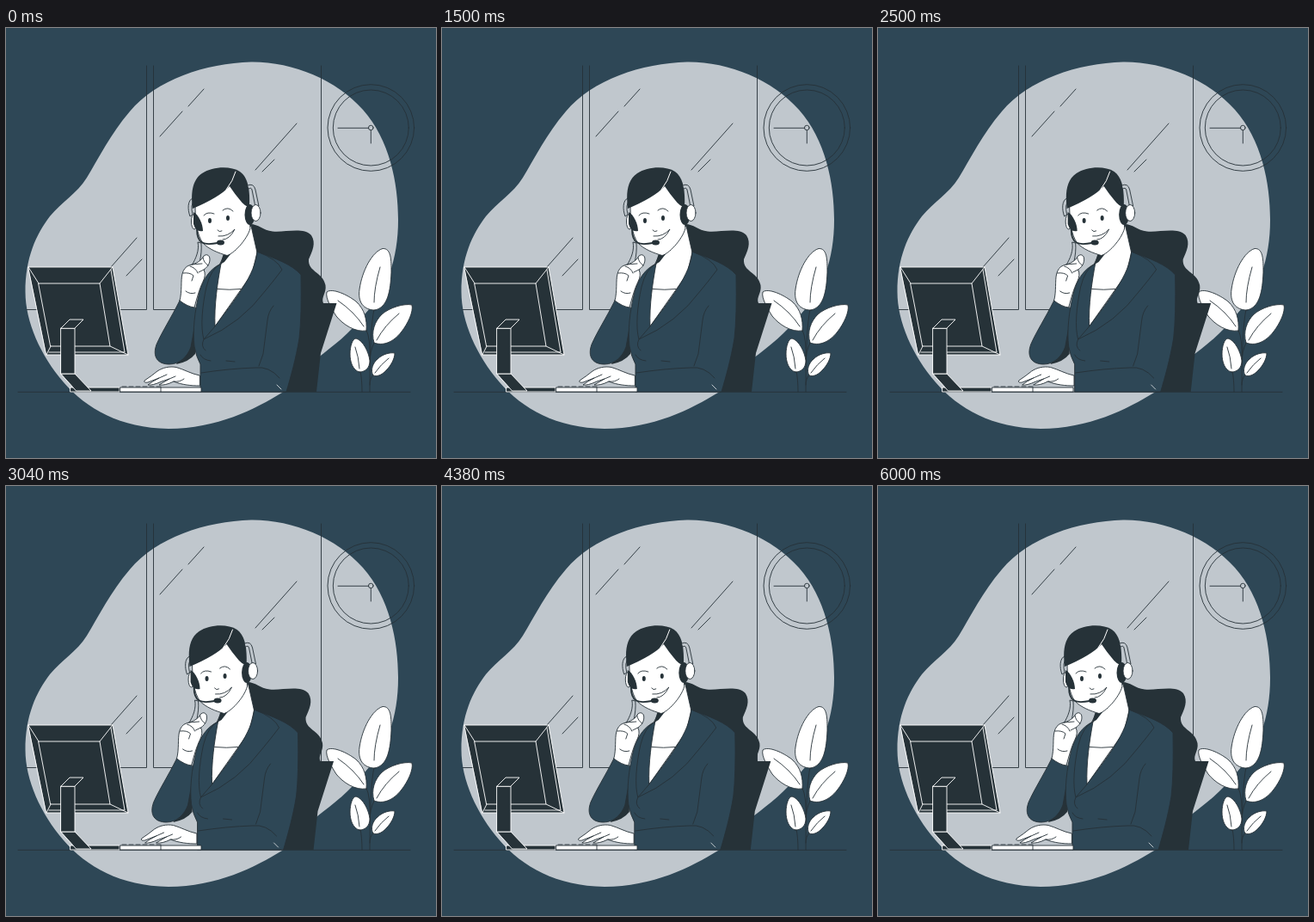
Write an HTML page that moves like this. It is 500 by 500 pixels and loops after 6040 ms.

```html
<!DOCTYPE html>
<html lang="en">
<head>
<meta charset="utf-8">
<title>Support desk</title>
<style>
  html, body { margin: 0; width: 100%; height: 100%; overflow: hidden; background: #2e4756; }
  svg { display: block; width: 100vw; height: 100vh; stroke-linejoin: round; stroke-linecap: round; }
  .line { fill: none; stroke: #263238; stroke-width: .9; }
  .white { fill: #fff; stroke: #263238; stroke-width: .9; }
  .suit { fill: #2e4756; stroke: #263238; stroke-width: .9; }
  .grey { fill: #c0c7cd; stroke: #263238; stroke-width: .9; }
  .dark { fill: #263238; }
  .edge { fill: #263238; stroke: #fff; stroke-width: .9; }
</style>
</head>
<body>
<svg viewBox="0 0 500 500">
  <!-- room -->
  <path fill="#c0c7cd" d="M285 39.500C333 39 384 60 415 95C446 130 456 180 456 223C456 268 443 308 413 337C400 355 381 369 362 384C347 398 340 413 321 424C290 443 245 466 189 466C133 465 94 443 67 412C40 381 22.500 341 22.500 307C22.500 267 35 240 51 219C65 202 82 193 94 174C108 151 121 124 144 97C175 60 232 41 285 39.500Z"/>
  <path class="line" d="M163.500 44V327.500H24M171.500 44V327.500H366.500V44M179 126L205 97M212 91L230 71M290 165L338 111M298 167L312 153M122 278L152 244M140 288L158 269"/>
  <g class="line">
    <circle cx="424.300" cy="116" r="50.300"/>
    <circle cx="424.300" cy="116" r="44"/>
    <circle cx="424.300" cy="116" r="2.800" fill="#c0c7cd"/>
    <path d="M386 116.300H421.500M424.300 119V134"/>
  </g>

  <!-- plant -->
  <path class="line" d="M428 327Q423 350 423 423M419 351Q424 362 423 385M428 366Q423 376 423 390M412 399Q414 408 414 423M427 403Q423 408 423 415"/>
  <g class="white">
    <path d="M429 328C415 328 409 318 411 304C414 282 426 260 438 256.500C448 256 448 270 448 284C447 306 444 325 429 328Z"/>
    <path d="M419 352C406 354 392 345 384 335C379 327 371 314 373 307C379 302 397 310 407 318C417 327 420 339 419 352Z"/>
    <path d="M428 366C424 353 429 341 437 333C446 325 463 320 472 322C474 330 467 344 460 353C450 366 438 370 428 366Z"/>
    <path d="M411 400C403 398 400 388 400 379C400 370 403 361 407 361C415 363 422 377 423 387C423 395 418 400 411 400Z"/>
    <path d="M427 404C423 398 427 389 432 385C438 379 447 377 452 378C452 385 447 393 443 397C438 403 432 406 427 404Z"/>
    <path fill="none" d="M428 319Q428 302 435 278M416 347Q405 330 386 317M431 363Q440 346 457 332M411 396Q410 382 406 371M429 401Q436 391 445 384"/>
  </g>

  <path class="line" d="M14 423.300H470"/>

  <g class="sway">
    <!-- chair and ponytail -->
    <path class="dark" d="M282 228C293 227 298 235 310 236.500C324 238 346 231 355 241C361 250 356 260 352 269C351 284 368 283 371.500 299C373 308 366 313 369 320H384.500L366 378L361 423H300L300 270L283 262Z"/>

    <!-- neck and shirt -->
    <path class="white" d="M255 262L285 230L292 261L286 286L243 347L238 330L248 276Z"/>
    <path class="dark" d="M253 262L261 263L254 272L249 275Z"/>
    <path class="line" d="M246 303.500Q260 305 273 303.500"/>

    <!-- jacket -->
    <path class="dark" d="M221 343L220 379Q213 388 198 391Z"/>
    <path class="suit" d="M202 317C192 337 181 354 175 368C170 382 176 391 190 391C202 391 211 382 215 371L223 327Z"/>
    <path class="suit" d="M250 274C237 280 229 292 225 307C219 330 217 353 219 370Q221 382 226 391V423H326C331 406 337 385 341 361Q344 335 343 287C333 275 313 268 292 260C290 287 266 316 243 347C242 322 246 296 250 274Z"/>
    <path class="line" d="M250 274Q238 280 233 301C228 324 226 348 230 362L243 347M292 260Q316 269 321 281Q312 293 302 305Q274 343 230 362Q226 370 232 375M311 323Q305 330 304 340L299 379L294 393M226 380Q229 386 238 387M256 387L266 388M227 401Q260 396 290 395Q306 393 318 407"/>
    <path fill="none" stroke="#fff" stroke-width=".7" d="M315 415L320 420"/>

    <!-- raised hand -->
    <path class="grey" d="M216 276C221 268 225 258 223 249L227 250Q228 260 225 273Z"/>
    <path class="white" d="M202 317C205 306 203 294 205 286Q207 278 213 276C221 274 227 271 230 265Q234 262 236.500 266C238 271 236 277 230 281Q233 287 229 295C225 303 222 314 219 325Q211 324 202 317Z"/>
    <path class="line" d="M230 281L224 284M229 267Q230 273 235 276M206 285Q214 284 218 288L216 294M214 277Q221 279 223 285M216 275L228 274M209 306Q214 310 220 308"/>

    <!-- head -->
    <path class="grey" d="M217 198C211 200 211 211 214 219L217 217Q214 205 219 201Z"/>
    <ellipse class="white" cx="219" cy="225" rx="3.500" ry="9"/>
    <path class="white" d="M220 204C220 224 222 241 229 250C235 257 248 262 257 264.500C264 263 280 247 284 233L282 202L261 180Z"/>
    <path class="dark" d="M217 210C215 193 216 177 228 169C240 161 261 160 272 167C282 174 284 190 283 208Q277 207 272 200Q266 193 260 184Q248 197 217 210Z"/>
    <path fill="none" stroke="#fff" stroke-width="1" d="M267 167Q264 178 256 188"/>
    <path class="grey" d="M281 183Q288 180 290 188L294 207L290 208L286 188Q285 185 282 187Z"/>
    <ellipse class="dark" cx="283.500" cy="217" rx="6" ry="12"/>
    <ellipse class="white" cx="290.500" cy="215" rx="5.500" ry="9.500"/>
    <path class="dark" d="M218 214C224 217 229 228 229 236Q221 238 218 228Z"/>

    <!-- face and microphone -->
    <ellipse class="dark" cx="237" cy="224" rx="2" ry="3"/>
    <ellipse class="dark" cx="258" cy="221" rx="2" ry="3"/>
    <path class="line" d="M230 218Q234 213 242 216M252 212Q258 207 264 213M246 235Q248 238 251 236M247 242Q258 243 266 234Q260 246 252 246"/>
    <path fill="none" stroke="#263238" stroke-width="1.800" d="M222 234C222 251 230 253 246 250"/>
    <ellipse class="dark" cx="249.500" cy="249.500" rx="4.500" ry="3"/>
  </g>

  <!-- monitor -->
  <g class="edge">
    <path d="M26 278H124L142 380H47Z"/>
    <path fill="none" d="M38 297H109L121 370H52ZM26 278L38 297M124 278L109 297M142 380L121 370M122 281L138 377H50M47 380L52 370"/>
    <path d="M75 418H132V423H75Z"/>
    <path d="M64 402H80L99 422H82Z"/>
    <path d="M64 349H80V402H64Z"/>
    <path d="M64 349L74 339H90L80 349Z"/>
  </g>

  <!-- keyboard -->
  <path class="white" d="M133 418H227V423H133ZM180 418V423"/>
  <path class="line" stroke-dasharray="5 3" d="M135 417H180"/>

  <g class="sway">
    <path class="white" d="M225 404C215 402 207 397 198 394.500C190 393 182 395 176 399Q170 404 161 410Q160 413 165 412L178 407Q170 411 165 415Q170 416 181 411L190 408L178 415Q185 416 195 411C205 415 215 416 225 416Z"/>
    <path class="line" d="M178 407L187 403M190 408L197 405M195 411Q202 412 207 408"/>
  </g>
</svg>
<script>
  const LOOP = 6040, STEP = 600;
  const shifts = [0, -1, 2, -4, 4, -4, 4, -4, 2, -1, 0];
  const parts = document.querySelectorAll('.sway');

  function draw(now) {
    const pos = Math.min(now % LOOP / STEP, 9.9999);
    const i = Math.floor(pos);
    const x = shifts[i] + (shifts[i + 1] - shifts[i]) * (pos - i);
    parts.forEach(part => part.setAttribute('transform', `translate(${x} 0)`));
    requestAnimationFrame(draw);
  }
  draw(performance.now());
</script>
</body>
</html>
```
